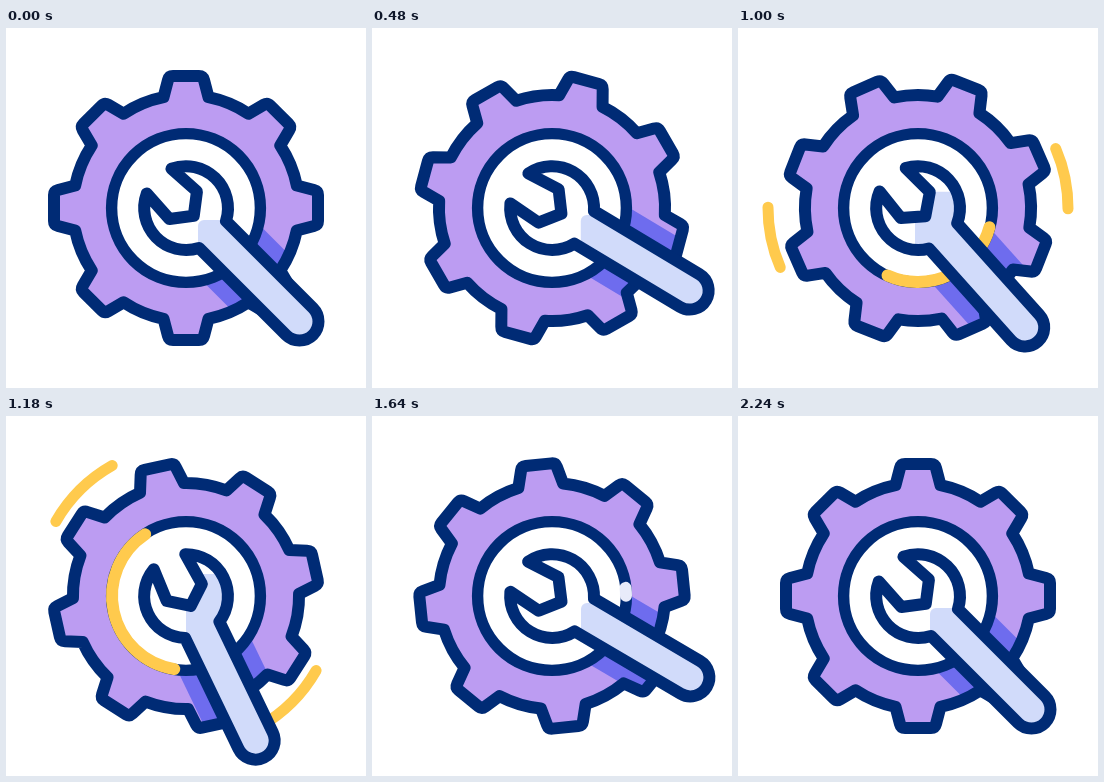
These frames come from a looping animation (360x360 px, 2.4 s). An HTML page:

```html
<!DOCTYPE html>
<html lang="en">
<head>
<meta charset="utf-8">
<title>Gear and wrench</title>
<style>
  html, body { margin: 0; width: 100%; height: 100%; overflow: hidden; background: #fff; }
  svg { display: block; width: 100vw; height: 100vh; }
  .line { fill: none; stroke: #002b75; stroke-width: 12; stroke-linejoin: round; }
  .arc { fill: none; stroke: #ffca4d; stroke-width: 11; stroke-linecap: round; }
</style>
</head>
<body>
<svg viewBox="0 0 360 360">
  <defs>
    <path id="gear"/>
    <path id="wrench" d="M-38-17.5 L-4-19.5 L11 0 L-4 19.5 L-38 17.5 A42 42 0 0 0 37.5 19 L160.5 19 A19 19 0 0 0 160.5-19 L37.5-19 A42 42 0 0 0 -38-17.5Z"/>
    <clipPath id="gearClip"><use href="#gear" class="spin"/></clipPath>
    <clipPath id="tintClip"><rect id="tintBox" width="400" height="400" rx="6"/></clipPath>
  </defs>

  <use href="#gear" class="spin" fill="#bc9cf2"/>
  <g clip-path="url(#gearClip)">
    <rect class="swing" y="-40" width="180" height="80" fill="#6e6cee"/>
  </g>
  <use href="#gear" class="spin line"/>
  <circle cx="180" cy="180" r="74.4" fill="#fff"/>
  <circle cx="180" cy="180" r="74.4" class="line" style="stroke-width:11.4"/>

  <path id="inner" class="arc" style="stroke-width:12"/>
  <path id="outerA" class="arc"/>
  <path id="outerB" class="arc"/>

  <use href="#wrench" class="swing" fill="#fff"/>
  <g clip-path="url(#tintClip)">
    <use href="#wrench" class="swing" fill="#d1dbfa"/>
  </g>
  <use href="#wrench" class="swing line"/>
</svg>

<script>
const LOOP = 2400, C = 180, SWEEP = 816;
const $ = id => document.getElementById(id);
const all = name => document.querySelectorAll('.' + name);

// [time, degrees]
const spinKeys = [[200, 0], [480, 15], [1000, 111.2], [1360, 229.2], [1640, 309], [1920, 339], [2240, 360]];
const swingKeys = [[200, 45], [480, 31], [740, 19], [1000, 48], [1215, 65], [1360, 55.2],
  [1640, 30.5], [1735, 27.4], [1920, 35.5], [2240, 45]];
// [wrench angle, left or top edge of the handle tint]
const tintLeft = [[30.5, 209], [35.5, 198], [45, 192], [48, 177], [55, 180]];
const tintTop = [[30.5, 187], [35.5, 184], [45, 192], [48, 164], [55, 158]];

// Monotone cubic through the keys, level at both ends and at turning points.
function curve(keys) {
  const rate = keys.slice(1).map((k, i) => (k[1] - keys[i][1]) / (k[0] - keys[i][0]));
  const slope = keys.map((k, i) => {
    const a = rate[i - 1], b = rate[i];
    return a * b > 0 ? 2 * a * b / (a + b) : 0;
  });
  return x => {
    const last = keys.length - 1;
    if (x <= keys[0][0]) return keys[0][1];
    if (x >= keys[last][0]) return keys[last][1];
    const i = keys.findIndex(k => k[0] > x) - 1;
    const [x0, y0] = keys[i], [x1, y1] = keys[i + 1];
    const h = x1 - x0, s = (x - x0) / h, e = s * s * (3 - 2 * s);
    return y0 + (y1 - y0) * e + h * s * (1 - s) * (slope[i] * (1 - s) - slope[i + 1] * s);
  };
}
const spinAt = curve(spinKeys), swingAt = curve(swingKeys);
const leftAt = curve(tintLeft), topAt = curve(tintTop);

function sweep(t, start) {
  const p = Math.min(1, Math.max(0, (t - start) / SWEEP));
  return (1 - Math.cos(Math.PI * p)) / 2;
}

const polar = (r, deg) => {
  const a = deg * Math.PI / 180;
  return (C + r * Math.cos(a)).toFixed(2) + ' ' + (C + r * Math.sin(a)).toFixed(2);
};

function drawArc(el, r, from, to) {
  const shown = to - from > 0.05;
  el.style.display = shown ? '' : 'none';
  if (shown) el.setAttribute('d', `M${polar(r, from)} A${r} ${r} 0 ${to - from > 180 ? 1 : 0} 1 ${polar(r, to)}`);
}

function gearPath() {
  const body = 113, tip = 132;
  // Each tooth: base, shoulder, rounded corner, and its mirror.
  const profile = [[-22.5, 110.8], [-18, 128], [-17, tip], [-13, tip], [13, tip], [17, tip], [18, 128], [22.5, 110.8]];
  let d = '';
  for (let i = 0; i < 8; i++) {
    const a = i * Math.PI / 4, cos = Math.cos(a), sin = Math.sin(a);
    const p = profile.map(([x, r]) => (x * cos + r * sin).toFixed(2) + ' ' + (x * sin - r * cos).toFixed(2));
    d += (i ? `A${body} ${body} 0 0 1 ` : 'M') +
      `${p[0]} L${p[1]} Q${p[2]} ${p[3]} L${p[4]} Q${p[5]} ${p[6]} L${p[7]} `;
  }
  return d + `A${body} ${body} 0 0 1 ${profile[0][0]} ${-profile[0][1]}Z`;
}

function turn(name, deg) {
  all(name).forEach(el => el.setAttribute('transform', `translate(${C} ${C}) rotate(${deg.toFixed(3)})`));
}

function draw(t) {
  const angle = swingAt(t);
  turn('spin', spinAt(t));
  turn('swing', angle);
  $('tintBox').setAttribute('x', leftAt(angle));
  $('tintBox').setAttribute('y', topAt(angle));

  const tail = 360 * sweep(t, 894);
  drawArc($('inner'), 74, tail, Math.min(359.9, 360 * sweep(t, 690)));
  $('inner').style.stroke = tail > 340 ? '#e8ebfa' : '';

  const from = 135 + 180 * sweep(t, 817), to = 135 + 180 * sweep(t, 728);
  drawArc($('outerA'), 150, from, to);
  drawArc($('outerB'), 150, from + 180, to + 180);
}

$('gear').setAttribute('d', gearPath());
const begin = performance.now();
function tick() {
  draw((performance.now() - begin) % LOOP);
  requestAnimationFrame(tick);
}
tick();
</script>
</body>
</html>
```
